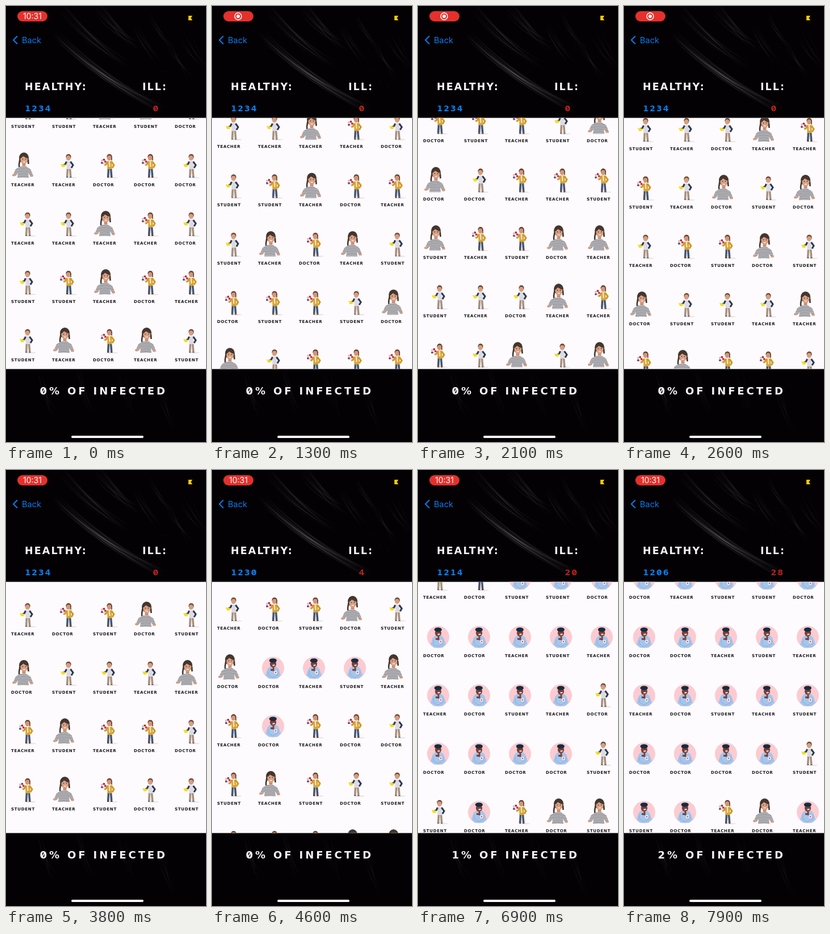
These frames come from a looping animation (352 px wide and 762 px high, 8000 ms). An HTML page with a canvas:

```html
<!DOCTYPE html>
<html lang="en">
<head>
<meta charset="utf-8">
<title>Infection grid</title>
<style>
html, body { margin: 0; width: 100%; height: 100%; overflow: hidden; background: #030103; }
canvas { display: block; width: 352px; height: 762px; }
</style>
</head>
<body>
<canvas id="stage" width="352" height="762"></canvas>
<script>
const W = 352, H = 762, LOOP = 8000, TOTAL = 1234, TOP = 195.5, BOTTOM = 634.5;
const stage = document.getElementById('stage').getContext('2d');
let g = stage;

const WIDE = '"DejaVu Sans", Verdana, sans-serif';
const UI = 'Inter, Roboto, sans-serif';
const WHITE = '#f4f3f5', BLUE = '#0a7cf0', RED = '#b3221e';
const JOBS = { S: 'STUDENT', T: 'TEACHER', D: 'DOCTOR' };

// Each row: healthy labels, figures (b boy, f florist, s striped),
// labels once ill, and the wave in which each person falls ill (0 = never).
const ROWS = [
  'SSTSD bbssb', 'TTDDD sbffb', 'TTTTD bbsfb', 'SSTDT bfsff', 'STDTS bsfsb',
  'DSTSD fffbs', 'DDTTS sbfff', 'STSDT sffss', 'STDTT bbbsf', 'STDSD fbsbs',
  'TDSDS bffsb DTSSD 44222', 'DSSTT sbbbs DDTST 21113', 'TSTDD fsffb TDSTS 21234',
  'STSDS fsfbb DDDDS 23230', 'SSTDS bbfss SDTDT 43004'
].map(row => row.split(' '));

// time, scroll offset
const SCROLL = [[0, 0], [1700, 262], [2600, 777], [3800, 944], [4600, 954], [5800, 1008]];

function slope(i) {
  const a = SCROLL[i], b = SCROLL[i + 1];
  return a && b ? (b[1] - a[1]) / (b[0] - a[0]) : 0;
}

// The harmonic mean of both neighbouring slopes never overshoots.
function speed(i) {
  const a = slope(i - 1), b = slope(i);
  return a && b ? 2 * a * b / (a + b) : 0;
}

function scrollAt(t) {
  const i = SCROLL.findIndex(key => key[0] > t);
  if (i < 0) return SCROLL.at(-1)[1];
  const [t0, y0] = SCROLL[i - 1], [t1, y1] = SCROLL[i];
  const d = t1 - t0, u = (t - t0) / d, r = 1 - u;
  return y0 * r * r * (1 + 2 * u) + y1 * u * u * (3 - 2 * u)
    + d * u * r * (speed(i - 1) * r - speed(i) * u);
}

function waveAt(t) {
  return Math.max(0, Math.min(4, Math.floor((t - 4200) / 1100) + 1));
}

function rect(color, x, y, w, h, r = 0) {
  g.fillStyle = color;
  g.beginPath();
  g.roundRect(x, y, w, h, r);
  g.fill();
}

function oval(color, x, y, rx, ry = rx) {
  g.fillStyle = color;
  g.beginPath();
  g.ellipse(x, y, rx, ry, 0, 0, 7);
  g.fill();
}

function trace(pts) {
  g.beginPath();
  for (let i = 0; i < pts.length; i += 2) g.lineTo(pts[i], pts[i + 1]);
}

function poly(color, ...pts) {
  trace(pts);
  g.fillStyle = color;
  g.fill();
}

function line(color, width, ...pts) {
  trace(pts);
  g.strokeStyle = color;
  g.lineWidth = width;
  g.stroke();
}

// Closes a right-hand outline with its reflection.
function mirror(axis, pts) {
  const all = [...pts];
  for (let i = pts.length - 2; i >= 0; i -= 2) all.push(2 * axis - pts[i], pts[i + 1]);
  return all;
}

function text(str, x, y, color, font, spacing = 0, align = 'left') {
  g.font = font;
  g.letterSpacing = spacing + 'px';
  g.textAlign = align;
  g.fillStyle = color;
  g.fillText(str, x, y);
}

function title(str, x, y, color, size, spacing) {
  str = String(str);
  text(str, x, y, color, `bold ${size}px ${WIDE}`, spacing);
  // slashed zeros
  [...str].forEach((char, i) => {
    if (char !== '0') return;
    const left = x + g.measureText(str.slice(0, i)).width;
    line(color, size / 10, left + size * .2, y - size * .08, left + size * .5, y - size * .65);
  });
}

// Figures are drawn with the origin at the left end of the label, on its centre line.
function standing(skin, hair, top, sleeve, trousers, shoes) {
  oval('#ebe7e6', 35, -12, 9, 1.4);
  for (const side of [-1, 1]) {
    line(trousers, 3.6, 29.5 + side * 2, -28, 29.7 + side * 3, -14);
    line(shoes, 2.2, 28 + side * 3, -13, 31.5 + side * 3, -13);
  }
  poly(top, 25, -41, 33, -41, 33.5, -27, 25.5, -27);
  line(sleeve, 3, 25.5, -40, 23, -35, 20, -34);
  line(sleeve, 3, 32.5, -40, 37, -34, 34, -29);
  oval(hair, 29, -48.5, 4.6, 4.8);
  oval(skin, 28.8, -46.3, 3.8, 4.4);
}

const FIGURES = {
  b() {
    standing('#d99d80', '#6a4936', '#dcdbe2', '#2c3854', '#a8917f', '#77716f');
    poly('#f3dc20', 15, -36, 24, -34.5, 22, -30.5, 17.5, -30.5);
  },
  f() {
    standing('#d3967a', '#664130', '#d9a32c', '#cf9824', '#465675', '#6b432b');
    line('#664130', 1.6, 33, -49, 33, -42);
    line('#e9e2dc', 2.4, 28.8, -41, 29.5, -31);
    ['#d42a35', '#e6dbe2', '#5c4a86', '#e8b8bb', '#b42435'].forEach((color, i) =>
      oval(color, 18.5 + 3.2 * Math.cos(i * 1.25), -40 + 3.6 * Math.sin(i * 1.25), 1.9));
  },
  s() {
    const body = mirror(21, [26, -32, 34, -27, 38, -18, 34, -15, 30, -20, 31, -12]);
    oval('#43352f', 22.5, -46.5, 8.5, 9.5);
    line('#43352f', 2.6, 15.5, -44, 14, -35, 14.5, -27);
    line('#43352f', 2.6, 30, -44, 30.5, -36);
    rect('#c98f74', 19.5, -38, 6, 8);
    g.save();
    poly('#cbcacd', ...body);
    g.clip();
    for (let y = -31; y < -11; y += 2.6) line('#717076', 1, 2, y, 21, y + 1, 40, y);
    g.restore();
    oval('#d59c80', 5, -16.5, 3, 2);
    oval('#d59c80', 36, -15.5, 3, 2);
    oval('#d89f82', 22.8, -43.5, 6.4, 7.8);
    line('#43352f', 3, 16.5, -47, 21, -51.5, 28.5, -47);
    oval('#4a342c', 20.3, -44.5, 1, .8);
    oval('#4a342c', 25.6, -44.5, 1, .8);
    line('#f6e6de', 1.3, 20.6, -39.5, 25, -39.5);
  },
  ill() {
    oval('#fbcbd1', 26.5, -32, 19.5);
    poly('#a5c6ec', ...mirror(26.5, [30, -36, 36, -31, 40, -19, 34, -13.5]));
    line('#86aad8', .9, 18, -27, 18, -20, 26, -15, 35, -20, 35, -27);
    oval('#7d3f35', 26.5, -39, 5.6, 6);
    oval('#142c42', 26.3, -45, 6.6, 3.8);
    line('#7d3f35', 3, 22, -29, 27, -28, 27, -33);
    line('#f7eeee', 2.2, 25.5, -36.5, 29.5, -37);
    rect('#f8e9ec', 28.5, -27, 5, 5.5, 1);
    rect('#c9414c', 30, -25.3, 2, 2);
  }
};

function random(seed) {
  return () => (seed = seed * 16807 % 2147483647) / 2147483647;
}

function makeBackdrop() {
  const layer = document.createElement('canvas');
  layer.width = W;
  layer.height = H;
  g = layer.getContext('2d');
  rect('#030103', 0, 0, W, H);
  const rnd = random(71);
  const near = (value, spread) => value + (rnd() - .5) * spread;

  function tuft(x, y, dx, dy, count, alpha) {
    for (let i = 0; i < count; i++) {
      const ax = near(x, 16), ay = near(y, 16), bx = near(x + dx, 20), by = near(y + dy, 20);
      const fade = g.createLinearGradient(ax, ay, bx, by);
      [0, near(alpha, alpha), 0].forEach((a, k) =>
        fade.addColorStop(k / 2, `rgba(190,188,195,${a})`));
      g.strokeStyle = fade;
      g.lineWidth = near(1.6, 1.6);
      g.beginPath();
      g.moveTo(ax, ay);
      g.quadraticCurveTo(ax + dx * .4, ay + dy * .6, bx, by);
      g.stroke();
    }
  }

  tuft(85, 45, 195, 135, 16, .1);
  tuft(95, 2, 120, 105, 10, .06);
  tuft(160, 0, 72, 72, 8, .08);
  for (let i = 0; i < 4; i++) {
    tuft(230 + 28 * i, near(40, 80), 40, 60, 5, .04);
    tuft(60 + 70 * i, near(650, 40), 25, 80, 5, .035);
  }
  for (let i = 0; i < 12; i++) oval('rgba(120,38,25,.35)', near(290, 90), near(115, 100), .7);
  g = stage;
  return layer;
}

function drawStatus(t) {
  rect('#e5302c', 20, 9, 53, 18, 9);
  if (t >= 1100 && t < 3100) {
    g.strokeStyle = '#fff';
    g.lineWidth = 1.5;
    g.beginPath();
    g.arc(46, 18, 6, 0, 7);
    g.stroke();
    oval('#fff', 46, 18, 3);
  } else {
    text('10:31', 46.5, 23, '#fff', `14px ${UI}`, 0, 'center');
  }
  poly('#f7c80e', 321, 17, 328, 17, 325.5, 21, 328, 25, 321, 25);
  line(BLUE, 2, 20, 52.5, 13, 59.5, 20, 66.5);
  text('Back', 28, 65, BLUE, `14.5px ${UI}`);
}

function drawList(t, wave) {
  const scroll = scrollAt(t);
  g.save();
  rect('#fdfbfd', 0, TOP, W, BOTTOM - TOP);
  g.clip();
  ROWS.forEach(([jobs, figures, illJobs, waves = '00000'], row) => {
    const y = 210 + 102 * row - scroll;
    if (y < TOP - 10 || y > BOTTOM + 62) return;
    for (let col = 0; col < 5; col++) {
      const ill = waves[col] > 0 && waves[col] <= wave;
      g.save();
      g.translate(9 + 72 * col, y);
      FIGURES[ill ? 'ill' : figures[col]]();
      text(JOBS[(ill ? illJobs : jobs)[col]], 0, 2.6, '#171518', `bold 7px ${WIDE}`, .75);
      g.restore();
    }
  });
  g.restore();
}

const backdrop = makeBackdrop();

function draw() {
  const t = Math.floor(performance.now() % LOOP / 100) * 100;
  const wave = waveAt(t);
  const ill = wave && 8 * wave - 4;
  g.drawImage(backdrop, 0, 0);
  drawStatus(t);
  title('HEALTHY:', 33, 146.5, WHITE, 17.5, 2.1);
  title('ILL:', 240, 146.5, WHITE, 17.5, 2.1);
  title(TOTAL - ill, 33.5, 184, BLUE, 14, 2);
  title(ill, 258.5, 184, RED, 14, 2);
  drawList(t, wave);
  title(Math.floor(ill / TOTAL * 100) + '% OF INFECTED', 59.5, 679, WHITE, 18, 3.9);
  rect('#fff', 115, 751, 127, 4, 2);
  requestAnimationFrame(draw);
}
draw();
</script>
</body>
</html>
```
